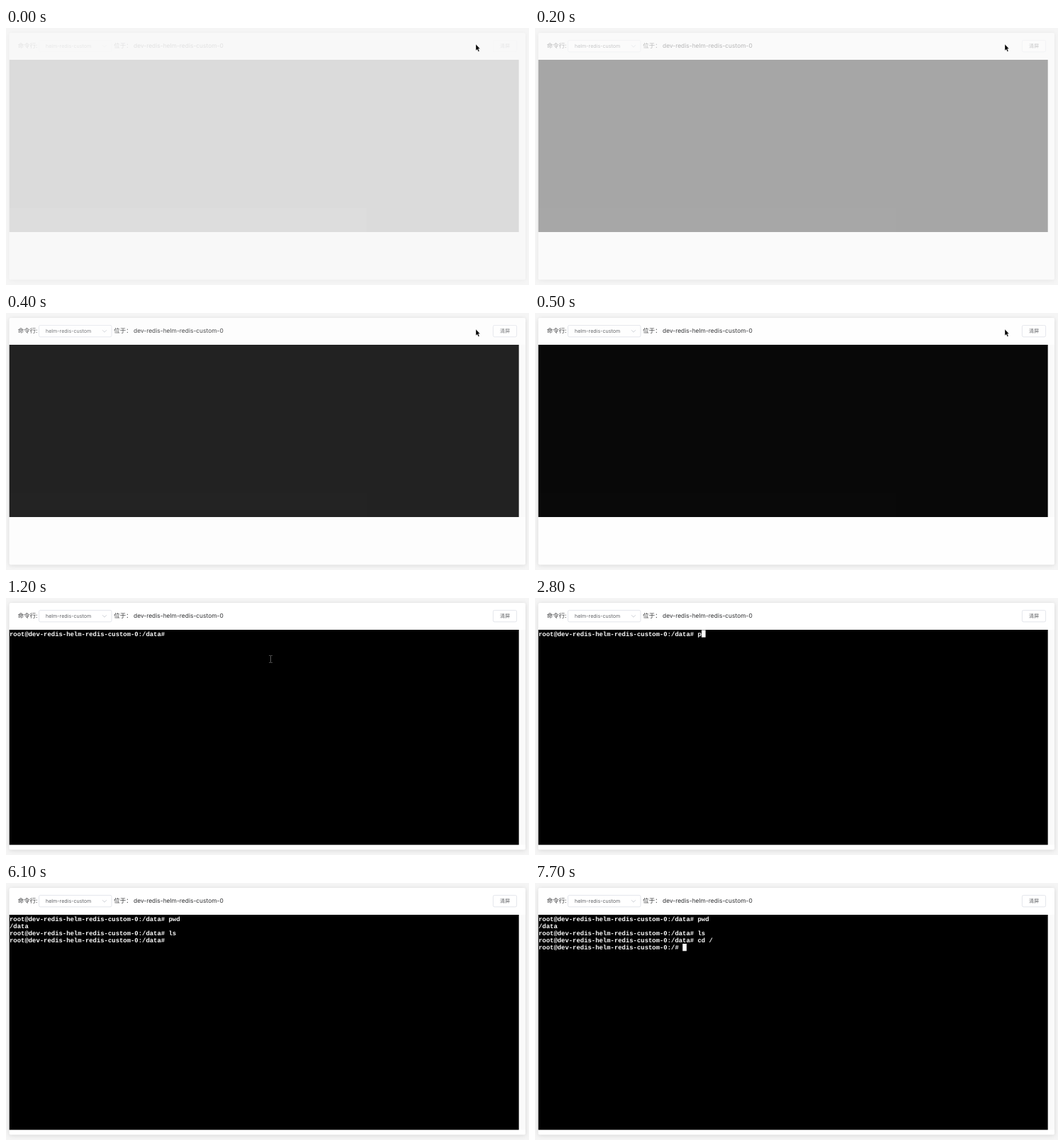
Recreate the animation shown at these times as an HTML page. Size 738 px wide and 364 px high, loop 8 s.

```html
<!DOCTYPE html>
<html>
<head>
<meta charset="utf-8">
<style>
  html, body { margin: 0; width: 100%; height: 100%; overflow: hidden; background: #f5f5f5; }
  svg { display: block; }
  text { white-space: pre; text-rendering: geometricPrecision; }
  #panel { fill: #fff; filter: drop-shadow(0 1px 3px rgba(0, 0, 0, .12)); }
  .label { font: 8.43px Inter, "Noto Sans CJK SC", "Noto Sans CJK", sans-serif; fill: #303133; }
  .small { font-size: 7.13px; fill: #606266; }
  .box { fill: #fff; stroke: #dcdfe6; stroke-width: .8; }
  #lines { font: bold 8.92px "Liberation Mono", "Courier New", monospace; fill: #fff; }
</style>
</head>
<body>
<svg width="738" height="364" viewBox="0 0 738 364">
  <rect id="panel" x="4.6" y="7" width="728.4" height="349.5" rx="2"/>
  <g id="content">
    <text class="label" x="16.8" y="28.2">命令行:</text>
    <rect class="box" x="46.5" y="17.4" width="102.5" height="16.4" rx="2"/>
    <text class="label small" x="56" y="28.1">helm-redis-custom</text>
    <path d="M136 24.2l3 3 3-3" fill="none" stroke="#c0c4cc" stroke-width=".8"/>
    <text class="label" x="152.3" y="28.2">位于：</text>
    <text class="label" x="180" y="28.2">dev-redis-helm-redis-custom-0</text>
    <rect class="box" x="687.4" y="17.4" width="33.2" height="16.4" rx="2"/>
    <text class="label small" x="704" y="28.1" text-anchor="middle">清屏</text>
    <rect class="screen" x="724" y="45" width="9" fill="#fafafa"/>
    <rect class="screen" x="4.7" y="45" width="719"/>
    <g id="lines"></g>
    <rect id="caret" width="5.6" height="10.3" fill="#fff"/>
  </g>
  <path id="arrow" d="M663 23v9l2-1.8 1.5 3.2 1.5-.7-1.5-3.1h2.5z" stroke="#fff" stroke-width=".4"/>
  <path id="beam" d="M-2.3-5h1.4q.9 0 .9.9v8.2q0 .9-.9.9h-1.4M2.3-5h-1.4q-.9 0-.9.9M2.3 5h-1.4q-.9 0-.9-.9" fill="none" stroke="#666" stroke-width=".9"/>
</svg>
<script>
const LOOP = 8000, STEP = 100;
const CHAR = 5.355, ROW = 10.15, LEFT = 5, TOP = 45.4;
const HOST = 'root@dev-redis-helm-redis-custom-0:';
const PROMPT = HOST + '/data# ';
const FADE = [.11, .11, .335, .62, .862, .965, 1];

// [time, appended text, caret visible]
const session = [
  [1100, PROMPT, 0], [1300, '', 1], [1800, '', 0], [2300, '', 1],
  [2800, 'p', 1], [3000, 'wd', 1], [3300, '\n/data\n' + PROMPT, 1],
  [3900, '', 0], [4500, '', 1], [5100, '', 0],
  [5200, 'l', 1], [5300, 's', 1], [5500, '\n' + PROMPT, 1],
  [6100, '', 0], [6300, 'c', 1], [6600, 'd', 1], [6700, ' ', 1],
  [7300, '', 0], [7500, '/', 1], [7700, '\n' + HOST + '/# ', 1],
];
// [time, x, y] of the pointer over the terminal
const pointerPath = [[1100, 470, 68], [1200, 373.5, 86.5], [1500, 360.5, 110]];

const $ = id => document.getElementById(id);
const screens = document.querySelectorAll('.screen');
const show = (el, on) => el.setAttribute('visibility', on ? 'visible' : 'hidden');

function pointerAt(t) {
  for (let i = 1; i < pointerPath.length; i++) {
    const [t0, x0, y0] = pointerPath[i - 1], [t1, x1, y1] = pointerPath[i];
    if (t <= t1) {
      const k = (t - t0) / (t1 - t0);
      return [x0 + (x1 - x0) * k, y0 + (y1 - y0) * k];
    }
  }
  return pointerPath[pointerPath.length - 1].slice(1);
}

function drawTerminal(t) {
  const past = session.filter(([time]) => time <= t);
  const rows = past.map(e => e[1]).join('').split('\n');
  $('lines').innerHTML = rows.map((row, i) =>
    `<text x="${LEFT}" y="${TOP + 8.3 + i * ROW}">${row}</text>`).join('');
  const last = rows.length - 1;
  $('caret').setAttribute('x', LEFT + rows[last].length * CHAR - .2);
  $('caret').setAttribute('y', TOP + last * ROW);
  show($('caret'), past.length && past[past.length - 1][2]);
}

let shown = -1;
function draw(t) {
  const alpha = FADE[Math.min(t / STEP, FADE.length - 1)];
  $('content').setAttribute('opacity', alpha);
  $('panel').setAttribute('opacity', .25 + .75 * alpha);
  screens.forEach(s => s.setAttribute('height', t < 1100 ? 244 : 304.6));
  drawTerminal(t);
  show($('arrow'), t < 1100);
  show($('beam'), t >= 1100 && t < 2800);
  if (t >= 1100) $('beam').setAttribute('transform', `translate(${pointerAt(t)})`);
}

function tick() {
  const t = Math.floor(performance.now() % LOOP / STEP) * STEP;
  if (t !== shown) draw(shown = t);
  requestAnimationFrame(tick);
}
tick();
</script>
</body>
</html>
```
